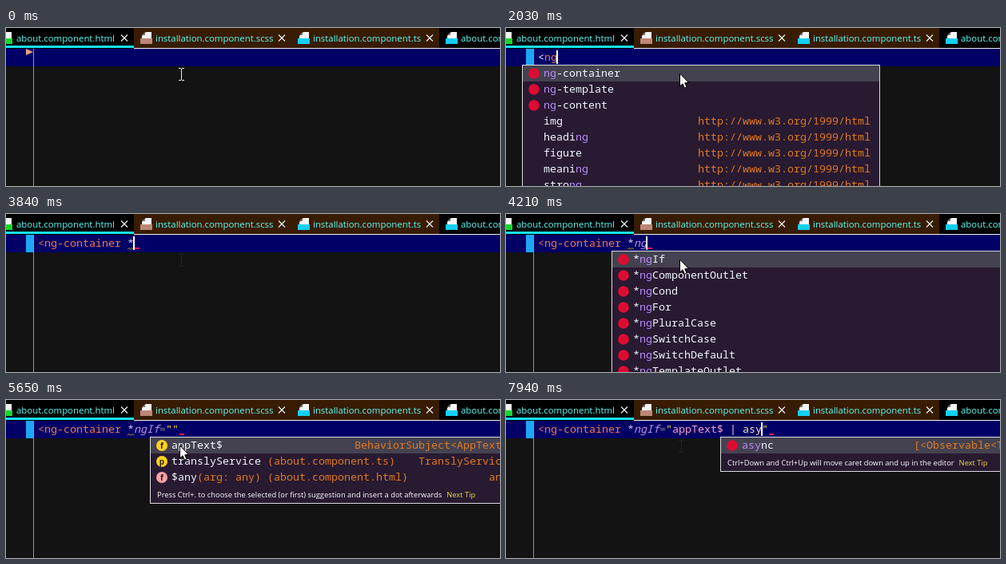
Animation of 618x198 px, one loop 8 s. Source, as an HTML page with a canvas:

```html
<!DOCTYPE html>
<html lang="en">
<head>
<meta charset="utf-8">
<title>Editor completion</title>
<style>
  html, body { margin: 0; width: 618px; height: 198px; overflow: hidden; background: #131313; }
  canvas { display: block; }
</style>
</head>
<body>
<canvas id="stage" width="618" height="198"></canvas>
<script>
const ctx = document.getElementById('stage').getContext('2d');
const LOOP = 8000, COL = 8, LEFT = 40;
const MONO = '500 13.333px "Noto Sans Mono", monospace';
const UI = '"Open Sans", "Noto Sans", sans-serif';
const ORANGE = '#e07a20', WHITE = '#f2f8ff', PURPLE = '#b88cff';
const PANEL = '#281a31', SELECTED = '#444250';

function box(x, y, w, h, color) {
  ctx.fillStyle = color;
  ctx.fillRect(x, y, w, h);
}

function put(text, x, y, color, font = MONO, align = 'left') {
  ctx.font = font;
  ctx.textAlign = align;
  ctx.fillStyle = color;
  ctx.fillText(text, x, y);
}

function dot(x, y, r, color) {
  ctx.fillStyle = color;
  ctx.beginPath();
  ctx.arc(x, y, r, 0, Math.PI * 2);
  ctx.fill();
}

function path(points, close) {
  ctx.beginPath();
  points.forEach(([x, y], i) => i ? ctx.lineTo(x, y) : ctx.moveTo(x, y));
  if (close) ctx.closePath();
}

// --- Completion lists: [name, icon, type, tail, letter] ---
const ng = (...names) => names.map(n => [n, 'ng']);
const tag = name => [name, '', 'http://www.w3.org/1999/html'];
const DOT_TIP = 'Press Ctrl+. to choose the selected (or first) suggestion and insert a dot afterwards';
const MOVE_TIP = 'Ctrl+Down and Ctrl+Up will move caret down and up in the editor';

const tags = { col: 1, right: 456, edge: 468, thumb: 27, rows: [
  ...ng('ng-container'), tag('div'), tag('section'), tag('s'),
  ...ng('router-outlet', 'ng-template'), tag('style'), ...ng('ng-content')] };
const tagsN = { ...tags, match: 'n', rows: [
  ...ng('ng-container', 'ng-template', 'ng-content'), tag('nav'), tag('noscript'),
  tag('section'), tag('input'), tag('span')] };
const tagsNg = { ...tags, match: 'ng', thumb: 0, rows: [
  ...ng('ng-container', 'ng-template', 'ng-content'), tag('img'), tag('heading'),
  tag('figure'), tag('meaning'), tag('strong')] };
const directives = { col: 15, match: 'ng', rows: ng('*ngIf', '*ngComponentOutlet', '*ngCond',
  '*ngFor', '*ngPluralCase', '*ngSwitchCase', '*ngSwitchDefault', '*ngTemplateOutlet') };
const directivesN = { ...directives, match: 'n' };
const directivesI = { col: 15, match: 'ngI', tip: DOT_TIP,
  rows: ng('*ngIf', '*ngSwitchCase', '*ngSwitchDefault') };
const members = { col: 21, right: 628, tip: DOT_TIP, rows: [
  ['appText$', '#ffd21e', 'BehaviorSubject<AppText>', '', 'f'],
  ['translyService', '#ffd21e', 'TranslyService', ' (about.component.ts)', 'p'],
  ['$any', '#f7a1a8', 'any', '(arg: any) (about.component.html)', 'f']] };
const asyncRow = ['async', 'ng', '[<Observable<T>'];
const pipesA = { col: 32, right: 630, match: 'a', rows: [asyncRow,
  ...ng('date', 'lowercase', 'uppercase', 'titlecase', 'translate', 'i18nPlural', 'keyvalue')] };
const pipesAs = { col: 32, right: 630, match: 'as', tip: MOVE_TIP, rows: [asyncRow] };
const pipesAsy = { ...pipesAs, match: 'asy' };

// --- Timeline: each step changes only what it names ---
const TAG = '<ng-container', IF = TAG + ' *ngIf="';
const expr = s => ({ text: IF + s + '"', caret: 21 + s.length, error: 22 + s.length });
const steps = [
  [0, { text: '', caret: 0, on: false, list: null, mouse: 'beam', error: 0, warn: false, mark: null, edited: false }],
  [110, { on: true }],
  [600, { on: false }],
  [850, { text: '<', caret: 1, on: true, edited: true }],
  [970, { list: tags, mouse: 'arrow' }],
  [1580, { text: '<n', caret: 2, list: tagsN }],
  [2030, { text: '<ng', caret: 3, list: tagsNg }],
  [2480, { text: TAG, caret: 13, list: null, mouse: 'beam', mark: [1, 12] }],
  [2830, { error: 13 }],
  [3160, { text: TAG + ' ', caret: 14, mark: null, mouse: 'dim' }],
  [3460, { text: TAG + ' *', caret: 15 }],
  [3530, { error: 0 }],
  [3840, { error: 15, warn: true }],
  [4020, { text: TAG + ' *n', caret: 16, error: 16 }],
  [4090, { list: directivesN, mouse: 'arrow' }],
  [4150, { text: TAG + ' *ng', caret: 17, error: 17 }],
  [4210, { list: directives }],
  [4520, { text: TAG + ' *ngI', caret: 18, error: 18, list: directivesI }],
  [4900, { ...expr(''), list: null }],
  [4960, { list: members }],
  [5650, { on: false }],
  [5950, { ...expr('appText$'), on: true, list: null }],
  [6020, { mouse: 'beam' }],
  [6270, { warn: false }],
  [6340, { mark: [21, 8] }],
  [6520, { ...expr('appText$ '), mark: null, mouse: 'dim' }],
  [7130, expr('appText$ |')],
  [7310, expr('appText$ | ')],
  [7510, expr('appText$ | a')],
  [7640, { list: pipesA }],
  [7760, { ...expr('appText$ | as'), list: pipesAs }],
  [7940, { ...expr('appText$ | asy'), list: pipesAsy }]
];

const stateAt = t => Object.assign({}, ...steps.filter(s => s[0] <= t).map(s => s[1]));

// --- Tab bar ---
function fileIcon(x, badge) {
  ctx.fillStyle = '#f5f5f5';
  path([[x + 7, 5], [x + 14, 5], [x + 14, 18], [x + 2, 18], [x + 2, 10]], true);
  ctx.fill();
  ctx.fillStyle = '#777';
  path([[x + 2, 9], [x + 6, 9], [x + 6, 5]], true);
  ctx.fill();
  box(x, 13, 15, 7, badge);
}

function cross(x) {
  ctx.strokeStyle = '#f0f0f0';
  ctx.lineWidth = 1.2;
  for (const d of [-4, 4]) {
    path([[x - 4, 12.5 - d], [x + 4, 12.5 + d]]);
    ctx.stroke();
  }
}

function tabs() {
  box(0, 0, 618, 26, '#000');
  box(160, 0, 382, 25, '#381c02');
  box(160, 25, 458, 1, '#f0f0f0');
  box(0, 22, 160, 3, '#16e4fb');
  const items = [
    [-7, 13, 'about.component.html', '#16d62c', 148],
    [168, 187, 'installation.component.scss', '#bd8776', 345],
    [365, 384, 'installation.component.ts', '#12cff5', 530],
    [550, 569, 'about.component.ts', '#12cff5', 0]
  ];
  for (const [icon, x, name, badge, close] of items) {
    fileIcon(icon, badge);
    put(name, x, 17, '#5cfff8', '11.4px ' + UI);
    if (close) cross(close);
  }
}

// --- Code line ---
function charColor(text, i) {
  if (i === 0 && text.length < 13) return WHITE;
  if (i < 13) return '#f07a4a';
  if (i < 19) return i === 14 ? '#d8c6ee' : '#c092e0';
  if (i === 19) return '#77777f';
  if (text[i] === '"') return '#ffe92e';
  return i < 29 ? '#ff9fc6' : '#ffe3b0';
}

function codeLine(s) {
  box(0, 26, 618, 22, '#000066');
  box(34, 26, 1, 172, '#969696');
  if (s.edited) {
    box(25, 26, 9, 22, '#1fa5f5');
  } else {
    ctx.fillStyle = '#f0a080';
    path([[25, 26], [34, 30], [25, 34]], true);
    ctx.fill();
  }
  if (s.mark) box(LEFT + s.mark[0] * COL, 28, s.mark[1] * COL, 18, '#073c10');
  [...s.text].forEach((c, i) => {
    const slant = i > 14 && i < 19 ? 'italic ' : '';
    put(c, LEFT + i * COL, 41, charColor(s.text, i), slant + MONO);
  });
  if (s.warn) {
    ctx.strokeStyle = '#c9a520';
    ctx.lineWidth = 1;
    path([0, 1, 2, 3, 4].map(i => [152 + i * 2, i % 2 ? 42.5 : 44.5]));
    ctx.stroke();
  }
  if (s.error) box(LEFT + s.error * COL + 1, 42, 6, 2, '#e0184c');
  if (s.on) box(LEFT + s.caret * COL - 1, 28, 2, 17, '#fff');
}

// --- Popup ---
function rowIcon(x, y, icon, letter) {
  if (icon === 'ng') return dot(x, y, 6.8, '#dd0b32');
  if (!icon) return;
  dot(x, y, 7, icon);
  put(letter, x, y + 3.5, '#30200a', 'bold 10px ' + UI, 'center');
}

function popup(p) {
  const x = LEFT + p.col * COL - 28, edge = p.edge || 660;
  const listEnd = 47 + p.rows.length * 20;
  const bottom = p.tip ? listEnd + 23 : 220;
  box(x, 46, edge - x, bottom - 46, '#d9d9de');
  box(x + 1, 47, edge - x - 2, bottom - 48, PANEL);
  box(x + 1, 47, edge - x - 2, 20, SELECTED);
  p.rows.forEach(([name, icon, type, tail, letter], i) => {
    const y = 61 + i * 20, tx = x + 27;
    rowIcon(x + 15, y - 4, icon, letter);
    const at = p.match ? name.indexOf(p.match) : -1;
    [...name].forEach((c, k) => {
      const hit = at >= 0 && k >= at && k < at + p.match.length;
      put(c, tx + k * COL, y, hit ? PURPLE : WHITE);
    });
    if (tail) put(tail, tx + name.length * COL, y, ORANGE);
    if (type) put(type, p.right, y, ORANGE, MONO, 'right');
  });
  if (p.thumb) box(457, 48, 9, p.thumb, '#b5b3b8');
  if (p.tip) {
    const font = '9.36px ' + UI, y = listEnd + 15;
    put(p.tip, x + 9, y, '#fff', font);
    put('Next Tip', x + 15 + ctx.measureText(p.tip).width, y, '#f0d83a', font);
  }
}

// --- Mouse pointer ---
function mouse(kind) {
  if (kind === 'arrow') {
    path([[217.5, 57], [217.5, 73], [221, 69.8], [223.5, 75.3], [226, 74.2], [223.8, 68.8], [228.5, 68.5]], true);
    ctx.fillStyle = '#fff';
    ctx.strokeStyle = '#000';
    ctx.lineWidth = 1;
    ctx.fill();
    ctx.stroke();
    return;
  }
  const color = kind === 'dim' ? '#242424' : '#f0f0f0';
  box(219, 51, 1, 14, color);
  for (const y of [50, 65]) {
    box(216, y, 3, 1, color);
    box(220, y, 3, 1, color);
  }
}

function draw(t) {
  const s = stateAt(t);
  box(0, 0, 618, 198, '#131313');
  tabs();
  codeLine(s);
  if (s.list) popup(s.list);
  mouse(s.mouse);
}

const start = performance.now();
function tick() {
  draw((performance.now() - start) % LOOP);
  requestAnimationFrame(tick);
}
tick();
</script>
</body>
</html>
```
